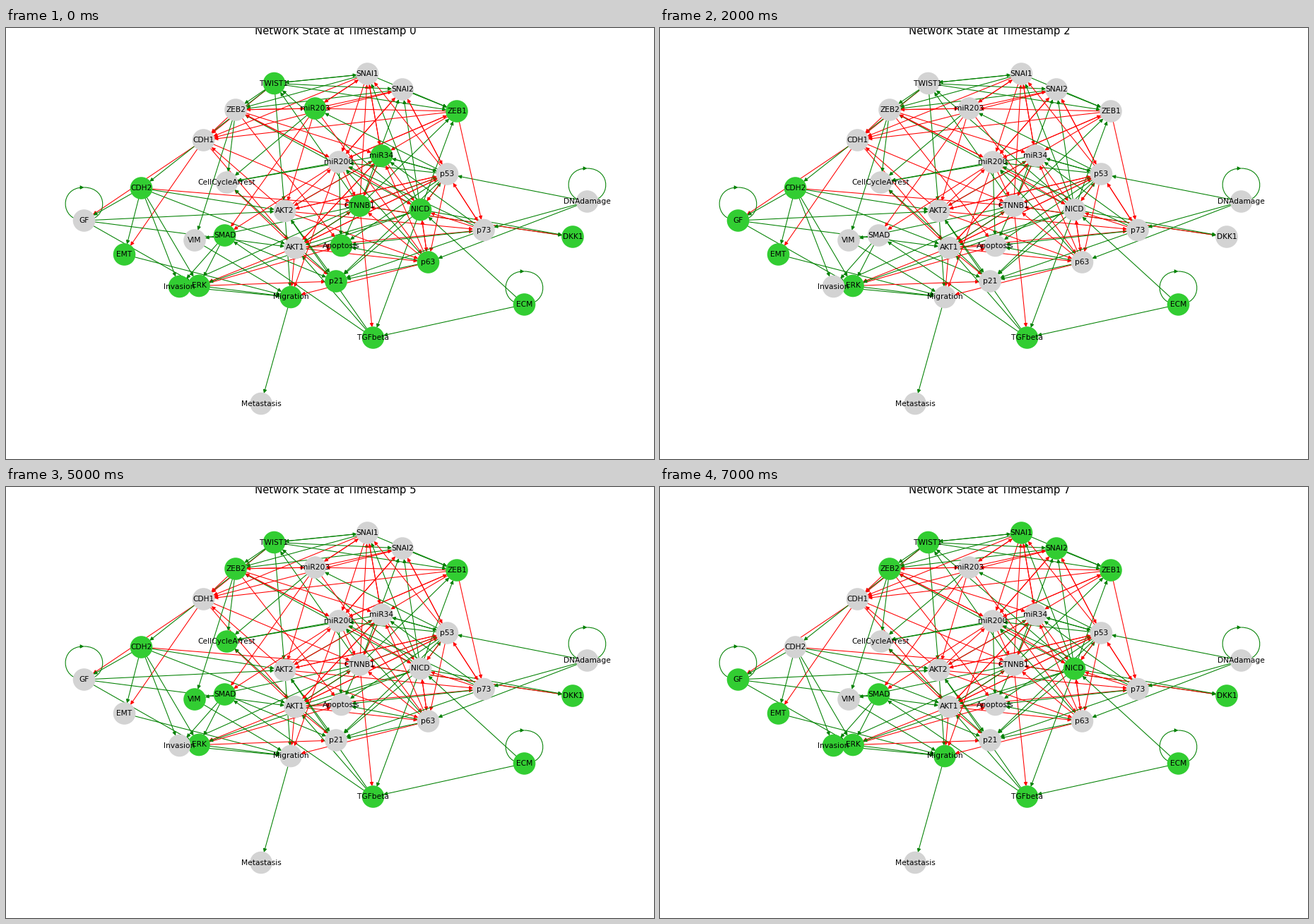
Recreate the animation shown at these times as a matplotlib script. Size 917 px wide and 611 px high, loop 8 s.

```python
import matplotlib.pyplot as plt
from matplotlib.animation import FuncAnimation
from matplotlib.patches import FancyArrowPatch
from matplotlib.path import Path

W, H, DPI = 917, 611, 100
K = 0.764  # scale of all point sizes
NODE_SIZE = 800

plt.rcParams["font.family"] = "DejaVu Sans"

POS = {
    "AKT1": (409, 311.5), "AKT2": (394.5, 259.5), "Apoptosis": (474.5, 308.5),
    "CDH1": (279.5, 159), "CDH2": (191.5, 227), "CTNNB1": (500.5, 252),
    "CellCycleArrest": (312.5, 219), "DKK1": (802, 296),
    "DNAdamage": (822.5, 246), "ECM": (733.5, 392), "EMT": (167.5, 321),
    "ERK": (273, 365.5), "GF": (110.5, 273), "Invasion": (245.5, 366.5),
    "Metastasis": (361, 532.5), "Migration": (403, 381.5), "NICD": (586.5, 257.5),
    "SMAD": (309.5, 294), "SNAI1": (511.5, 65), "SNAI2": (561, 87),
    "TGFbeta": (519.5, 439), "TWIST1": (379.5, 78.5), "VIM": (267, 301),
    "ZEB1": (638, 118), "ZEB2": (325, 116), "miR200": (471, 190),
    "miR203": (437.5, 114), "miR34": (531.5, 181), "p21": (467, 359),
    "p53": (624.5, 207), "p63": (597.5, 332), "p73": (676, 286.5),
}

# target: "activators | inhibitors"
INPUTS = {
    "AKT1": "CTNNB1 NICD TGFbeta GF CDH2 | p53 miR34 CDH1",
    "AKT2": "TWIST1 TGFbeta GF CDH2 | miR203 miR34 p53",
    "Apoptosis": "p53 p63 p73 miR200 miR34 | ZEB2 AKT1 ERK",
    "CDH1": "| TWIST1 SNAI2 ZEB1 ZEB2 SNAI1 AKT2",
    "CDH2": "TWIST1 |",
    "CTNNB1": "| DKK1 p53 AKT1 miR34 miR200 CDH1 CDH2 p63",
    "CellCycleArrest": "miR203 miR200 miR34 ZEB2 p21 | AKT1",
    "DKK1": "CTNNB1 NICD |",
    "DNAdamage": "DNAdamage |",
    "ECM": "ECM |",
    "EMT": "CDH2 | CDH1",
    "ERK": "SMAD CDH2 GF NICD | AKT1",
    "GF": "GF CDH2 | CDH1",
    "Invasion": "SMAD CDH2 CTNNB1 |",
    "Metastasis": "Migration |",
    "Migration": "VIM AKT2 ERK EMT Invasion | miR200 AKT1 p63",
    "NICD": "ECM | p53 p63 p73 miR200 miR34",
    "SMAD": "TGFbeta | miR200 miR203",
    "SNAI1": "NICD TWIST1 | miR203 miR34 p53 CTNNB1",
    "SNAI2": "TWIST1 CTNNB1 NICD | miR200 p53 miR203",
    "TGFbeta": "ECM NICD | CTNNB1",
    "TWIST1": "CTNNB1 NICD SNAI1 |",
    "VIM": "CTNNB1 ZEB2 |",
    "ZEB1": "TWIST1 SNAI1 CTNNB1 SNAI2 NICD | miR200",
    "ZEB2": "SNAI1 SNAI2 TWIST1 NICD | miR200 miR203",
    "miR200": "p63 p53 p73 | AKT2 SNAI1 SNAI2 ZEB1 ZEB2",
    "miR203": "p53 | SNAI1 ZEB1 ZEB2",
    "miR34": "p53 p73 AKT2 | SNAI1 ZEB1 ZEB2 p63 AKT1",
    "p21": "SMAD NICD p63 p53 p73 AKT2 | AKT1 ERK",
    "p53": "DNAdamage CTNNB1 NICD miR34 | SNAI2 p73 AKT1 AKT2",
    "p63": "DNAdamage | NICD AKT1 AKT2 p53 miR203",
    "p73": "DNAdamage | p53 ZEB1 AKT1 AKT2",
}

# active nodes at each timestamp, besides the two that always are
ALWAYS = {"ECM", "ERK"}
ACTIVE = [
    "TWIST1 miR203 ZEB1 miR34 CDH2 CTNNB1 NICD DKK1 SMAD Apoptosis EMT p63 "
    "p21 Invasion Migration TGFbeta",
    "TWIST1 ZEB1 p53 CDH2 CellCycleArrest GF VIM DKK1 EMT Invasion Metastasis",
    "GF CDH2 EMT TGFbeta",
    "CDH1 GF NICD SMAD EMT TGFbeta",
    "TWIST1 SNAI1 SNAI2 ZEB1 ZEB2 CDH1 p53 NICD DKK1 SMAD TGFbeta",
    "TWIST1 ZEB1 ZEB2 CDH2 CellCycleArrest VIM SMAD DKK1 TGFbeta",
    "SNAI1 SNAI2 CDH2 CellCycleArrest AKT2 NICD GF VIM SMAD EMT Invasion TGFbeta",
    "TWIST1 SNAI1 SNAI2 ZEB1 ZEB2 NICD GF SMAD DKK1 EMT Invasion Migration TGFbeta",
]


def edge_list():
    edges = []
    for target, rule in INPUTS.items():
        for color, names in zip(("green", "red"), rule.split("|")):
            edges += [(source, target, color) for source in names.split()]
    return sorted(edges)


def loop_path(x, y, half=35, rise=47):
    top = y - rise
    points = [(x, top), (x + half, top), (x + half, y), (x, y),
              (x - half, y), (x - half, top), (x, top)]
    return Path(points, [Path.MOVETO] + [Path.CURVE4] * 6)


def draw_edge(source, target, color):
    if source == target:
        shape = dict(path=loop_path(*POS[source]))
    else:
        margin = NODE_SIZE ** 0.5 / 2 * K
        shape = dict(posA=POS[source], posB=POS[target],
                     shrinkA=margin, shrinkB=margin)
    ax.add_patch(FancyArrowPatch(arrowstyle="-|>", mutation_scale=10 * K,
                                 color=color, lw=K, zorder=1, **shape))


fig = plt.figure(figsize=(W / DPI, H / DPI), dpi=DPI, facecolor="white")
ax = fig.add_axes([0, 0, 1, 1])
ax.set_xlim(0, W)
ax.set_ylim(H, 0)
ax.axis("off")

for edge in edge_list():
    draw_edge(*edge)

nodes = ax.scatter(*zip(*POS.values()), s=NODE_SIZE * K ** 2,
                   c="lightgray", linewidths=1.5 * K, zorder=2)
for name, (x, y) in POS.items():
    ax.text(x, y, name, size=10 * K, ha="center", va="center", zorder=3)
title = ax.text(466, 9.5, "", size=14 * K, ha="center", va="baseline")


def update(step):
    active = ALWAYS | set(ACTIVE[step].split())
    nodes.set_color(["limegreen" if n in active else "lightgray" for n in POS])
    title.set_text(f"Network State at Timestamp {step}")
    return nodes, title


anim = FuncAnimation(fig, update, frames=len(ACTIVE), interval=1000, repeat=True)
plt.show()
```
